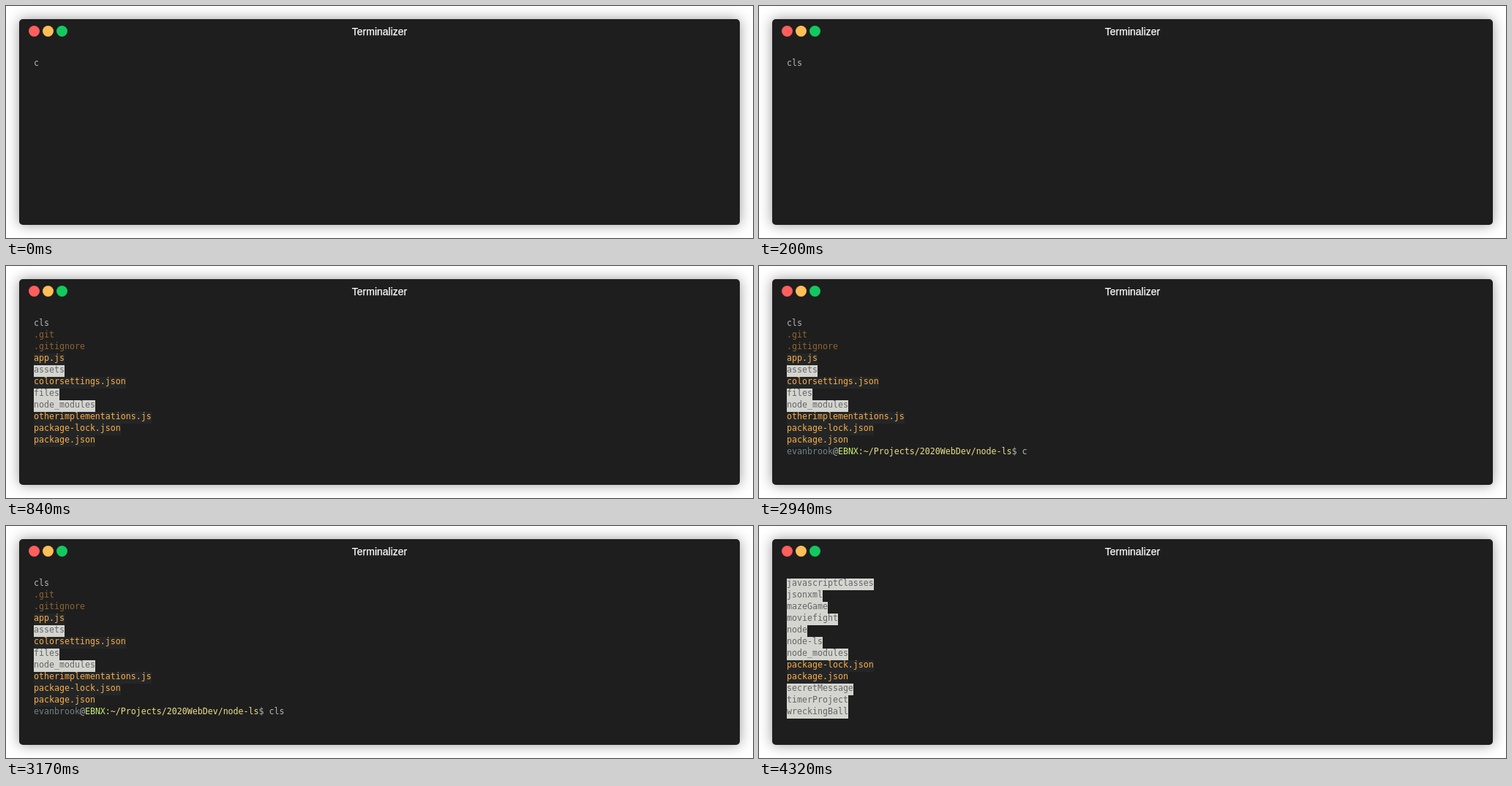
An HTML page for the animation above (4.42 s loop, 1021 px wide and 318 px high).

```html
<!DOCTYPE html>
<html lang="en">
<head>
<meta charset="utf-8">
<title>Terminalizer</title>
<style>
html, body { margin: 0; width: 100%; height: 100%; overflow: hidden; background: #fff; }
.window {
  position: absolute; left: 18px; top: 18px; width: 985px; height: 282px;
  border-radius: 5px; background: #1e1e1e; box-shadow: 0 0 18px rgba(0, 0, 0, .4);
}
.window h1 {
  position: absolute; left: 0; top: 9px; width: 100%; margin: 0; text-align: center;
  font: 14px/16px "Liberation Sans", Arial, sans-serif; color: #fff;
  -webkit-text-stroke: .25px #fff;
}
.dot { position: absolute; top: 9px; width: 15px; height: 15px; border-radius: 50%; }
.red { left: 13px; background: #ff5f5d; }
.amber { left: 32px; background: #ffbe57; }
.lime { left: 51px; background: #12c95f; }

.screen {
  position: absolute; left: 20px; top: 54px; white-space: pre; color: #b8b8b8;
  font: 11.627px/12px "DejaVu Sans Mono", monospace;
}
.row { height: 16px; }
.file, .dir { display: inline-block; height: 16px; vertical-align: top; }
.file { color: #ffae42; background: #232628; }
.dir { color: #626566; background: #d5d5d0; }
.hidden { color: #8f6530; }
.user { color: #708387; }
.host { color: #c8ed71; }
.path { color: #ebdf86; }

/* One 4.42 s loop; everything switches without fading. */
[class*="at-"] { animation: 4420ms step-end infinite; }
.at-l { animation-name: l; }
.at-s { animation-name: s; }
.at-list { animation-name: list; }
.at-prompt { animation-name: prompt; }
.at-c2 { animation-name: c2; }
.at-l2 { animation-name: l2; }
.at-s2 { animation-name: s2; }
.at-dot1 { animation-name: dot1; }
.at-dot2 { animation-name: dot2; }
.at-parent { animation-name: parent; }
.at-first { animation-name: first; }
@keyframes l { 0% { opacity: 0 } 2.262%, to { opacity: 1 } }
@keyframes s { 0% { opacity: 0 } 4.524%, to { opacity: 1 } }
@keyframes list { 0% { opacity: 0 } 19.004%, to { opacity: 1 } }
@keyframes prompt { 0% { opacity: 0 } 21.266%, to { opacity: 1 } }
@keyframes c2 { 0% { opacity: 0 } 66.515%, to { opacity: 1 } }
@keyframes l2 { 0% { opacity: 0 } 69.457%, to { opacity: 1 } }
@keyframes s2 { 0% { opacity: 0 } 71.719%, to { opacity: 1 } }
@keyframes dot1 { 0% { opacity: 0 } 78.506%, to { opacity: 1 } }
@keyframes dot2 { 0% { opacity: 0 } 82.352%, to { opacity: 1 } }
@keyframes parent { 0% { opacity: 0 } 97.737%, to { opacity: 1 } }
@keyframes first { 0% { opacity: 1 } 97.737%, to { opacity: 0 } }
</style>
</head>
<body>
<div class="window">
  <i class="dot red"></i><i class="dot amber"></i><i class="dot lime"></i>
  <h1>Terminalizer</h1>
  <div class="screen at-first"><div class="row">c<span class="at-l">l</span><span class="at-s">s</span></div><div class="at-list"><div class="row hidden">.git</div><div class="row hidden">.gitignore</div><div class="row"><span class="file">app.js</span></div><div class="row"><span class="dir">assets</span></div><div class="row"><span class="file">colorsettings.json</span></div><div class="row"><span class="dir">files</span></div><div class="row"><span class="dir">node_modules</span></div><div class="row"><span class="file">otherimplementations.js</span></div><div class="row"><span class="file">package-lock.json</span></div><div class="row"><span class="file">package.json</span></div></div><div class="row at-prompt"><span class="user">evanbrook</span>@<span class="host">EBNX:</span><span class="path">~/Projects/2020WebDev/node-ls</span>$ <span class="at-c2">c</span><span class="at-l2">l</span><span class="at-s2">s</span> <span class="at-dot1">.</span><span class="at-dot2">.</span></div></div>
  <div class="screen at-parent"><div class="row"><span class="dir">javascriptClasses</span></div><div class="row"><span class="dir">jsonxml</span></div><div class="row"><span class="dir">mazeGame</span></div><div class="row"><span class="dir">moviefight</span></div><div class="row"><span class="dir">node</span></div><div class="row"><span class="dir">node-ls</span></div><div class="row"><span class="dir">node_modules</span></div><div class="row"><span class="file">package-lock.json</span></div><div class="row"><span class="file">package.json</span></div><div class="row"><span class="dir">secretMessage</span></div><div class="row"><span class="dir">timerProject</span></div><div class="row"><span class="dir">wreckingBall</span></div></div>
</div>
</body>
</html>
```
